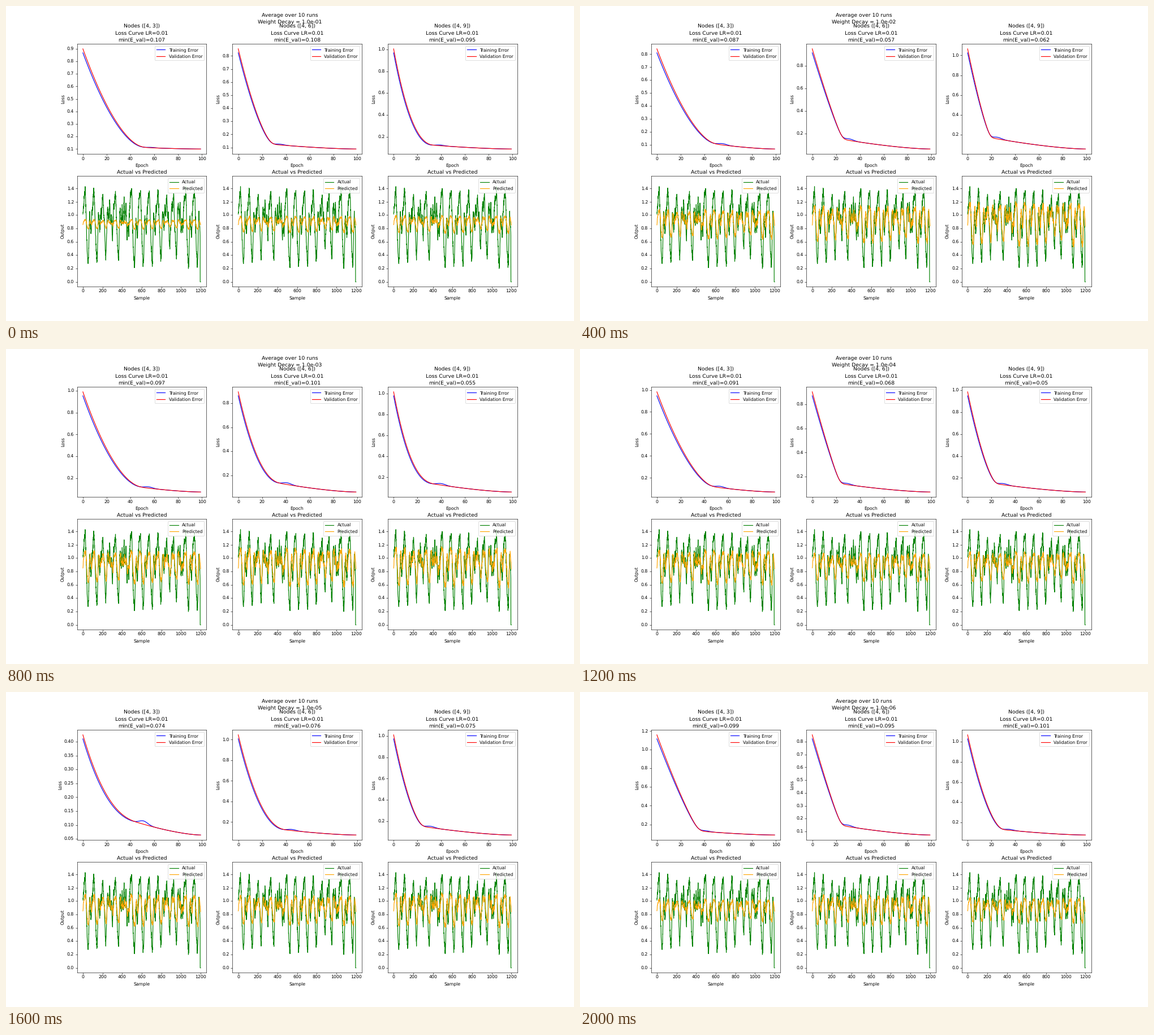
These frames come from a looping animation (1004 px wide and 558 px high, 2.4 s). A matplotlib script:

```python
import numpy as np
import matplotlib.pyplot as plt
from matplotlib.animation import FuncAnimation

plt.rcParams.update({"font.family": "DejaVu Sans", "text.hinting": "none"})

WIDTH, HEIGHT, DPI = 1004, 558, 55.8
LINE_STEP = 11.7  # pixels between title baselines
HIDDEN_NODES = (3, 6, 9)
EPOCHS = np.arange(100)


def mackey_glass(last, size, delay=25):
    """Mackey-Glass series up to `last`, zero after it."""
    x = np.zeros(size)
    x[0] = 1.5
    for t in range(last):
        past = x[t - delay] if t >= delay else 0.0
        x[t + 1] = 0.9 * x[t] + 0.2 * past / (1 + past**10)
    return x


def make_series():
    """Noisy target and a smooth linear forecast scaled to -1..1."""
    rng = np.random.default_rng(7)
    x = mackey_glass(1500, 1506)
    x[:1501] += rng.normal(0, 0.035, 1501)
    t = np.arange(301, 1501)
    target = x[t + 5]
    inputs = np.column_stack([x[t - lag] for lag in (20, 15, 10, 5, 0)])
    inputs -= inputs.mean(axis=0)
    ridge = inputs.T @ inputs + 20 * np.eye(5)
    forecast = inputs @ np.linalg.solve(ridge, inputs.T @ (target - target.mean()))
    low, high = np.percentile(forecast, [0.3, 99.7])
    return target, (2 * forecast - low - high) / (high - low)


class Panel:
    """One network: loss range, best loss, forecast spread and loss shape.

    The loss falls steeply until the knee epoch, the more curved the larger
    the bend, then creeps down a tail that grows with the forecast spread.
    """

    def __init__(self, low, high, best, spread, knee, bend):
        self.best, self.spread = best, spread
        span = high - low
        self.limits = low - 0.05 * span, high + 0.05 * span
        tail = 0.24 * spread
        drop = 0.05 * np.logaddexp(0, (1 - EPOCHS / knee) / 0.05)
        creep = (1 - EPOCHS / 99) ** 1.5
        self.validation = low + (span - tail) * drop**bend + tail * creep
        bump = 0.025 * spread * np.exp(-((EPOCHS - knee - 5) / 5) ** 2)
        self.training = self.validation - 0.04 * span * drop + bump

    def predict(self, wave):
        return 0.86 + self.spread / 2 * wave


RUNS = [
    (Panel(0.100, 0.900, 0.107, 0.15, 52, 1.75),
     Panel(0.088, 0.854, 0.108, 0.25, 30, 1.55),
     Panel(0.087, 1.006, 0.095, 0.27, 34, 2.3)),
    (Panel(0.068, 0.842, 0.087, 0.44, 50, 1.7),
     Panel(0.060, 0.952, 0.057, 0.56, 26, 1.15),
     Panel(0.055, 1.066, 0.062, 0.66, 20, 1.3)),
    (Panel(0.074, 0.990, 0.097, 0.50, 50, 1.85),
     Panel(0.062, 0.894, 0.101, 0.58, 36, 2.2),
     Panel(0.060, 1.017, 0.055, 0.60, 35, 2.5)),
    (Panel(0.072, 0.983, 0.091, 0.52, 48, 1.65),
     Panel(0.073, 0.903, 0.068, 0.43, 24, 1.15),
     Panel(0.072, 0.985, 0.05, 0.47, 25, 1.55)),
    (Panel(0.064, 0.425, 0.074, 0.48, 46, 2.4),
     Panel(0.074, 1.047, 0.076, 0.45, 40, 2.15),
     Panel(0.071, 1.011, 0.075, 0.51, 26, 1.7)),
    (Panel(0.087, 1.158, 0.099, 0.34, 36, 1.2),
     Panel(0.072, 0.853, 0.095, 0.47, 25, 1.15),
     Panel(0.075, 1.068, 0.101, 0.38, 30, 1.7)),
]

actual, wave = make_series()
samples = np.arange(len(actual))

# The tiny surplus keeps the canvas from rounding down a pixel.
fig, axes = plt.subplots(2, 3, figsize=((WIDTH + 0.01) / DPI, (HEIGHT + 0.01) / DPI), dpi=DPI)


def text_lines(x, base, count):
    """Centred empty lines, the last one with its baseline at pixel row `base`."""
    rows = [base - LINE_STEP * i for i in reversed(range(count))]
    return [fig.text(x, 1 - row / HEIGHT, "", ha="center", va="baseline", size=12)
            for row in rows]


def fill(lines, *words):
    for line, word in zip(lines, words):
        line.set_text(word)


def make_column(loss_ax, output_ax):
    train, = loss_ax.plot(EPOCHS, EPOCHS, color="blue", label="Training Error")
    val, = loss_ax.plot(EPOCHS, EPOCHS, color="red", label="Validation Error")
    loss_ax.set(xlabel="Epoch", ylabel="Loss")
    output_ax.plot(samples, actual, color="green", label="Actual")
    pred, = output_ax.plot(samples, actual, color="orange", label="Predicted")
    output_ax.set(title="Actual vs Predicted", xlabel="Sample", ylabel="Output",
                  ylim=(-0.067, 1.582))
    for ax in (loss_ax, output_ax):
        ax.legend(loc="upper right")
    box = loss_ax.get_position()
    title = text_lines((box.x0 + box.x1) / 2, 62.4, 3)
    return loss_ax, title, train, val, pred


heading = text_lines(0.5, 30.7, 2)
columns = [make_column(*pair) for pair in axes.T]


def update(k):
    fill(heading, "Average over 10 runs", f"Weight Decay = {10.0 ** -(k + 1):.1e}")
    for nodes, panel, (ax, title, train, val, pred) in zip(HIDDEN_NODES, RUNS[k], columns):
        fill(title, f"Nodes ([4, {nodes}])", "Loss Curve LR=0.01", f"min(E_val)={panel.best}")
        ax.set_ylim(panel.limits)
        train.set_ydata(panel.training)
        val.set_ydata(panel.validation)
        pred.set_ydata(panel.predict(wave))


anim = FuncAnimation(fig, update, frames=len(RUNS), init_func=lambda: update(0),
                     interval=400, repeat=True, repeat_delay=0)
plt.show()
```
